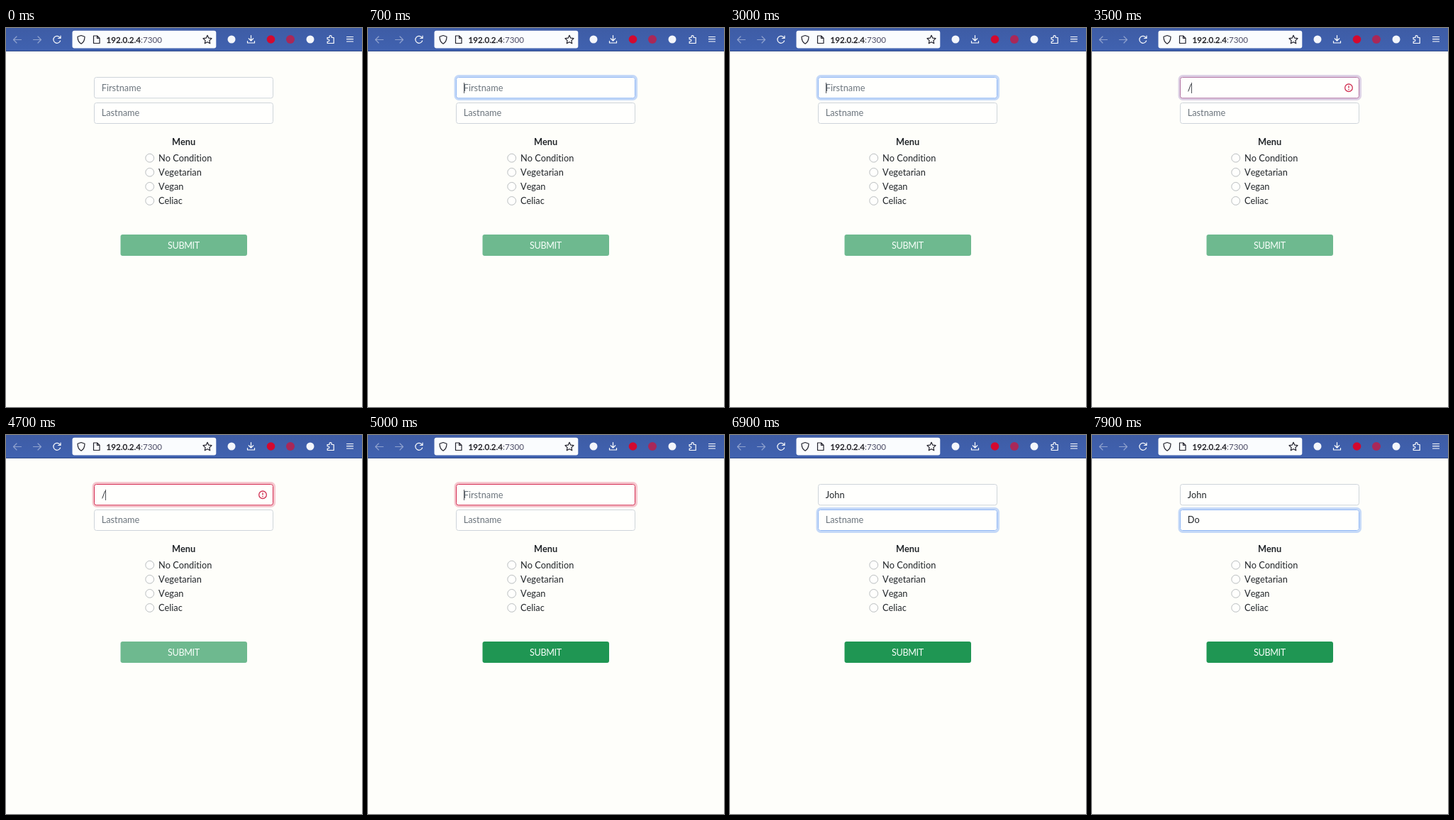
An HTML page that plays this animation: 502x534 px, repeating every 8000 ms.

```html
<!DOCTYPE html>
<html lang="en">
<head>
<meta charset="utf-8">
<title>Menu form</title>
<style>
  html, body { margin: 0; width: 100%; height: 100%; overflow: hidden; background: #fefefa; }
  svg { display: block; width: 502px; height: 534px; }
  text {
    font: 12.75px Lato, sans-serif; font-kerning: none; font-variant-ligatures: none;
    fill: #212529; white-space: pre;
  }
  .hint { fill: #6c757d; }
  .bold { font-weight: 700; }
  .address { font-size: 11.6px; fill: #4d4d66; }
  .host { fill: #15141a; stroke: #15141a; stroke-width: .3; }
  .label { font-size: 12.6px; letter-spacing: -.35px; fill: #f8fffa; }
  .line { fill: none; stroke: #fff; stroke-width: 1.2; stroke-linecap: round; stroke-linejoin: round; }
  .dark { stroke: #24242e; }
  .dim { opacity: .42; }
  .box { fill: #fffffd; stroke: #ced4da; }
  .ring { fill: none; stroke-width: 3; }
  .caret { stroke: #50545a; stroke-width: 1; }
  .radio circle { fill: #fffffd; stroke: #b9bdbf; }
</style>
</head>
<body>
<svg viewBox="0 0 502 534">
  <defs>
    <linearGradient id="bar" x2="0" y2="1">
      <stop stop-color="#3e5ca5"/>
      <stop offset="1" stop-color="#4062b0"/>
    </linearGradient>
  </defs>
  <rect width="502" height="534" fill="#fefefa"/>

  <g id="toolbar">
    <rect width="502" height="32" fill="url(#bar)"/>
    <rect y="32" width="502" height="1" fill="#304a88"/>
    <path class="line dim" d="M21.5 16.5h-11m4.5-4.5l-4.5 4.5l4.5 4.5M38.5 16.5h11m-4.5-4.5l4.5 4.5l-4.5 4.5"/>
    <path class="line" d="M76 13.5a5 5 0 1 0 .6 4.500M77 11v3.500h-3.500"/>
    <rect x="93.500" y="3.700" width="202.800" height="24.800" rx="3" fill="#fafcfe"/>
    <path class="line dark" d="M106 10.500l5 1.800c0 5-1.500 8-5 10c-3.500-2-5-5-5-10z"/>
    <path class="line dark" d="M123.500 11h5l3.500 3.500v7h-8.500zM128.500 11v3.500h3.500"/>
    <path class="line dark" d="M284 10.300l1.800 3.900l4.200.5l-3.100 2.900l.8 4.200l-3.700-2.100l-3.700 2.100l.8-4.200l-3.100-2.900l4.200-.5z"/>
    <text class="address" x="141.500" y="20.800"><tspan class="host">192.0.2.4</tspan>:7300</text>
    <circle cx="318" cy="16" r="5.500" fill="#f4f6fb"/>
    <path class="line" d="M345.500 10.500v7.500m-3.300-3.200l3.300 3.200l3.300-3.200M340.500 18.500v2.500h10v-2.500"/>
    <circle cx="373.500" cy="16" r="5.800" fill="#d3092f"/>
    <circle cx="401" cy="16" r="6" fill="#a92858"/>
    <circle cx="429" cy="16" r="5.500" fill="#f4f6fb"/>
    <path class="line" d="M453 13.500h3v-1.200a1.600 1.600 0 0 1 3.200 0v1.200h3v8h-9v-2.500h1.200a1.500 1.500 0 0 0 0-3h-1.200z"/>
    <path class="line" d="M480.500 12.500h9M480.500 15.700h9M480.500 19h9"/>
  </g>

  <g id="first">
    <rect class="ring" x="123" y="67.500" width="255.500" height="33" rx="5"/>
    <rect class="box" x="124.500" y="69.500" width="252" height="29.300" rx="3"/>
    <text class="hint" x="134.700" y="88.800">Firstname</text>
    <text class="value" x="134.700" y="88.800"></text>
    <path class="caret" d="M0 77v15"/>
  </g>
  <g id="alert" fill="none" stroke="#d02f51" stroke-width="1.300">
    <circle cx="362" cy="84.300" r="5.300"/>
    <path d="M362 81.200v3.600m0 1.300v1.300"/>
  </g>

  <g id="last">
    <rect class="ring" x="123" y="103.500" width="255.500" height="33" rx="5"/>
    <rect class="box" x="124.500" y="105.500" width="252" height="29" rx="3"/>
    <text class="hint" x="134.700" y="124.300">Lastname</text>
    <text class="value" x="134.700" y="124.300"></text>
    <path class="caret" d="M0 112.500v15"/>
  </g>

  <text class="bold" x="250.500" y="164.500" text-anchor="middle">Menu</text>
  <g class="radio">
    <circle cx="202.700" cy="183.200" r="5.900"/><text x="215" y="187.700">No Condition</text>
    <circle cx="202.700" cy="203.300" r="5.900"/><text x="215" y="207.800">Vegetarian</text>
    <circle cx="202.700" cy="223.400" r="5.900"/><text x="215" y="227.900">Vegan</text>
    <circle cx="202.700" cy="243.500" r="5.900"/><text x="215" y="248">Celiac</text>
  </g>

  <rect id="button" x="161.500" y="291" width="178.500" height="30" rx="3"/>
  <text class="label" x="250.500" y="310.800" text-anchor="middle">SUBMIT</text>
</svg>
<script>
const LOOP = 8000;
const FADE = 150;

// Border colour, then ring colour with its opacity, for each field state.
const IDLE = [206, 212, 218, 13, 110, 253, 0];
const FOCUS = [146, 184, 244, 25, 105, 240, .25];
const ERROR = [212, 45, 82, 220, 53, 90, .27];

// Each step holds from its time until the next one.
const firstText = [[0, ''], [3400, '/'], [3800, '//'], [4700, '/'], [5000, ''],
  [5800, 'J'], [6000, 'Jo'], [6200, 'Joh'], [6400, 'John']];
const firstCaret = [[0, false], [500, true], [4200, false], [4700, true],
  [5400, false], [5800, true], [6600, false]];
const lastText = [[0, ''], [7600, 'D'], [7800, 'Do']];
const lastCaret = [[0, false], [7600, true], [7900, false]];
const enabled = [[0, false], [3400, true], [3500, false], [5000, true]];
const invalid = [[0, false], [3500, true], [5000, false]];

const find = id => document.getElementById(id);
const at = (steps, t) => steps.findLast(([time]) => time <= t)[1];
const mix = (a, b, k) => a.map((v, i) => v + (b[i] - v) * k);
const show = (node, on) => { node.style.visibility = on ? 'visible' : 'hidden'; };

function ramp(t, start) {
  const p = Math.min(1, Math.max(0, (t - start) / FADE));
  return p * p * (3 - 2 * p);
}

function drawField(id, text, caretOn, look) {
  const part = name => find(id).querySelector('.' + name);
  const [r, g, b, ...ring] = look;
  const value = part('value');
  if (value.textContent !== text) value.textContent = text;
  show(part('hint'), !text);
  part('box').style.stroke = `rgb(${r},${g},${b})`;
  part('ring').style.stroke = `rgba(${ring})`;
  const width = text ? value.getComputedTextLength() : 0;
  part('caret').setAttribute('transform', `translate(${Math.round(134.5 + width) + .5})`);
  show(part('caret'), caretOn);
}

function draw(t) {
  const focus = ramp(t, 450) - ramp(t, 6550);
  const error = ramp(t, 3425) - ramp(t, 5010);
  drawField('first', at(firstText, t), at(firstCaret, t), mix(mix(IDLE, FOCUS, focus), ERROR, error));
  drawField('last', at(lastText, t), at(lastCaret, t), mix(IDLE, FOCUS, ramp(t, 6550)));
  show(find('alert'), at(invalid, t));
  find('button').style.fill = at(enabled, t) ? '#1f9653' : '#6eb98f';
}

let start;
function tick(now) {
  start ??= now;
  draw((now - start) % LOOP);
  requestAnimationFrame(tick);
}
draw(0);
requestAnimationFrame(tick);
</script>
</body>
</html>
```
